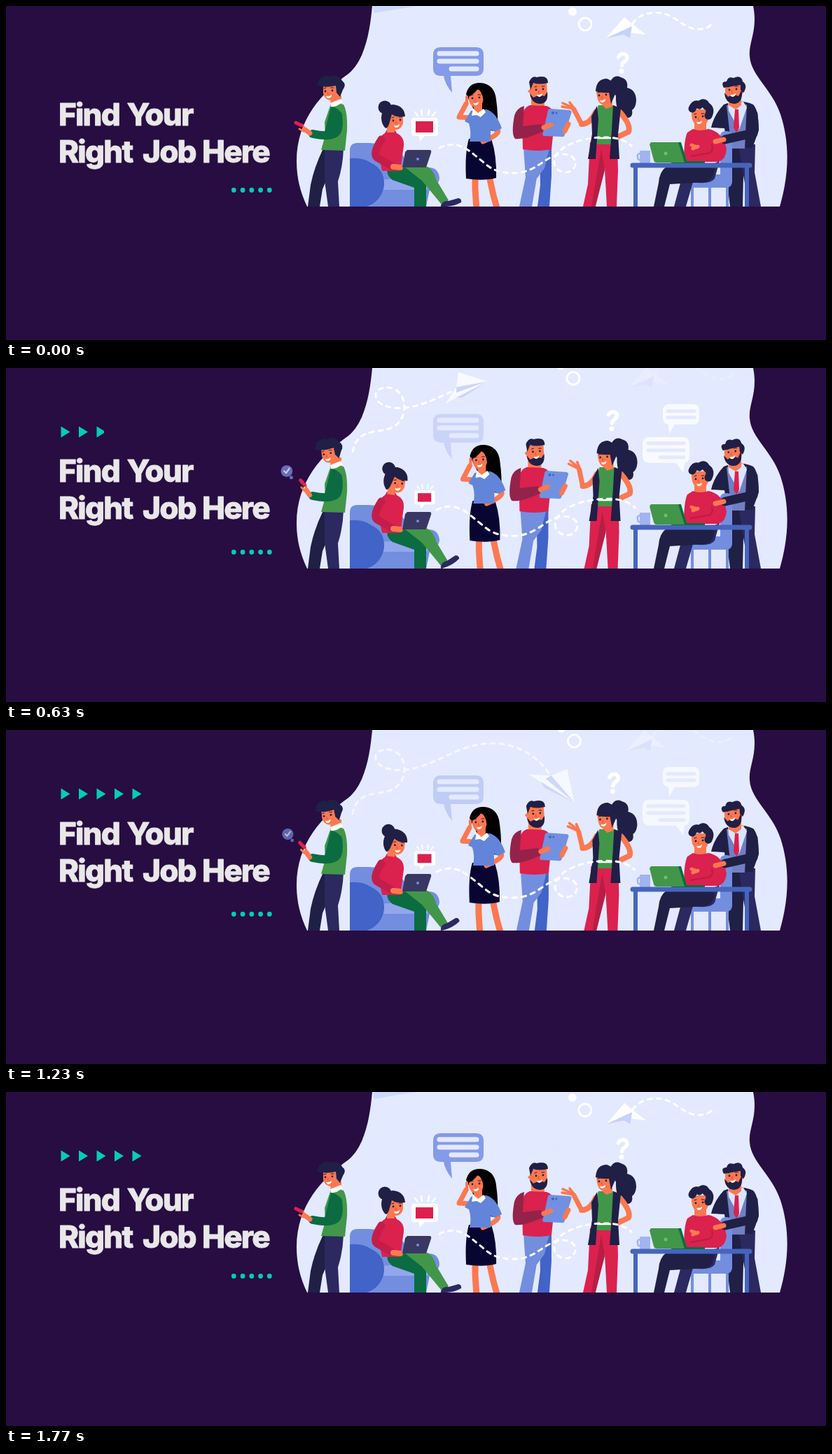
An HTML page that plays this animation: 1171 by 478 pixels, repeating every 1.8 s.

```html
<!DOCTYPE html>
<html lang="en">
<head>
<meta charset="utf-8">
<title>Find Your Right Job Here</title>
<style>
html, body { margin: 0; width: 100%; height: 100%; overflow: hidden; background: #270d42; }
svg { display: block; width: 1171px; height: 478px; }
text { font: 800 44px Inter, sans-serif; letter-spacing: -1.8px; fill: #e9e7e8; stroke: #e9e7e8; stroke-width: .8; stroke-linejoin: round; }
.line { fill: none; stroke-linecap: round; stroke-linejoin: round; }
.trail { stroke: #fff; stroke-width: 3; stroke-dasharray: 6 7; }
.skin { fill: #fb7850; } .skinLine { stroke: #fb7850; }
.navy { fill: #201f46; } .navyLine { stroke: #201f46; }
.ink { fill: #2b2960; }
.red { fill: #db214e; } .redLine { stroke: #db214e; }
.wine { fill: #93234a; }
.green { fill: #429649; }
.forest { fill: #0a6c40; } .forestLine { stroke: #0a6c40; }
.sky { fill: #738edf; } .skyLine { stroke: #738edf; }
.blue { fill: #4263c7; }
.white { fill: #fff; } .whiteLine { stroke: #fff; }
.fold { fill: #c5d2fa; }
.pale { fill: #e3e9ff; } .paleLine { stroke: #e3e9ff; }
</style>
</head>
<body>
<svg viewBox="0 0 1171 478">
<defs>
  <g id="face">
    <circle cx="-5" cy="-1" r="1.400" class="navy"/><circle cx="5" cy="-2" r="1.400" class="navy"/>
    <path class="line navyLine" d="M-7-5l3-1M3-6l4 0"/>
    <path class="line" stroke="#d95438" d="M-1 0l-1 3 2 0"/>
    <path class="white" d="M-4 6Q1 7 4 4Q4 8 0 9Q-3 9-4 6Z"/>
  </g>
  <clipPath id="stage"><path d="M0 0H1171V287H0Z"/></clipPath>
  <clipPath id="wipe"><rect id="wipeRect" x="78" y="80" height="24"/></clipPath>
  <mask id="reveal" maskUnits="userSpaceOnUse" x="480" y="0" width="350" height="140">
    <path id="revealPath" class="line whiteLine" stroke-width="9"/>
  </mask>
</defs>

<g clip-path="url(#stage)">
  <path class="pale" d="M523 0C520 32 514 76 489 97C452 123 415 162 415 222C415 250 422 270 430 287H1105C1119 238 1119 195 1106 155C1094 119 1064 100 1062 72C1060 52 1074 35 1067 0Z"/>
  <path id="sliver" fill="#cbd8ff" d="M523-6H610L586 0L526 10Z"/>

  <g id="rings">
    <circle cx="809" cy="8" r="6" class="white"/>
    <circle cx="827" cy="26" r="9" class="line whiteLine" stroke-width="3"/>
  </g>
  <g id="rightPlane">
    <path class="line trail" d="M895 25C903 12 920 8 935 10C956 13 965 30 985 33C998 34 1005 30 1008 25"/>
    <path class="white" d="M857 46L883 16L896 27L914 41L890 38Z"/>
    <path class="fold" d="M857 46L894 29L891 46L882 41Z"/>
  </g>
  <g id="question">
    <path class="line whiteLine" stroke-width="5.500" d="M874.500 73C877 67 887 67 887 74C887 80 880 79 879.500 85"/>
    <circle cx="879" cy="93" r="3.500" class="white"/>
  </g>

  <g id="blueBubble">
    <path fill="#849be9" d="M621 59H671Q682 59 682 70V89Q682 100 671 100H635L637 124Q627 112 625 100H621Q610 100 610 89V70Q610 59 621 59Z"/>
    <path class="line paleLine" stroke-width="7" d="M619 68H672M619 79H672M636 90H672"/>
  </g>
  <g id="whiteBubbles">
    <path class="white" d="M947 59H981Q990 59 990 68V79Q990 88 981 88H955L947 102L946 88Q938 87 938 79V68Q938 59 947 59Z"/>
    <path class="line paleLine" stroke-width="5" d="M945 69H983M945 78H983"/>
    <path class="white" d="M919 106H966Q976 106 976 116V133Q976 142 969 143L967 157L957 143H919Q909 143 909 133V116Q909 106 919 106Z"/>
    <path class="line paleLine" stroke-width="5" d="M917 115H968M917 125H968M934 135H968"/>
  </g>

  <g id="flight">
    <path id="flightTrail" class="line trail" mask="url(#reveal)"/>
    <g id="flyer">
      <path class="white" d="M0 0L-74 22L-51-1L-43-24Z"/>
      <path class="fold" d="M0 0L-51-1L-53 8Z"/><path class="fold" d="M0 0L-44 18L-55 16Z"/>
    </g>
  </g>

  <!-- reader with phone -->
  <path class="navy" d="M453 204H476L461 241L452 262L448 287H431L435 256Q440 231 453 204Z"/>
  <path class="ink" d="M455 204H482Q481 230 474 251L476 287H460L455 250Z"/>
  <path class="skin" d="M464 128H479V143H463Z"/>
  <path class="green" d="M464 140Q475 138 482 141Q488 152 487 178L484 207L450 206L456 185L455 166Z"/>
  <path class="white" d="M463 139L478 133L481 138L472 143L464 145Z"/>
  <path class="line forestLine" stroke-width="12" d="M474 156Q477 178 470 182Q460 188 438 183"/>
  <path class="forest" d="M464 144Q474 145 479 154L466 180L455 180Z"/>
  <g id="phone">
    <path class="line skinLine" stroke-width="7" d="M434 182L427 177"/>
    <path class="line skinLine" stroke-width="3" d="M427 176L423 170M425 179L419 176"/>
    <path class="line redLine" stroke-width="5" d="M414 167L422 171"/>
  </g>
  <g id="readerHead">
    <path class="skin" d="M453 113Q465 105 477 113L476 128Q472 135 463 135Q455 134 453 125Z"/>
    <path class="navy" d="M443 113Q447 109 447 105Q456 97 463 101Q475 96 480 107Q487 112 481 120L477 130L472 124L471 114Q455 118 443 113Z"/>
    <use href="#face" x="461" y="123"/>
  </g>
  <g id="check">
    <circle r="9" fill="#7888d9"/><circle cx="7" cy="10" r="2.700" fill="#7888d9"/>
    <path class="line whiteLine" stroke-width="2.400" d="M-4 0L-1 3L4-4"/>
  </g>

  <!-- sofa -->
  <path class="sky" d="M491 287V207Q491 196 502 196H518Q570 198 574 232H598Q617 228 619 246Q619 256 606 258L600 287Z"/>
  <path fill="#92a6ed" d="M525 250Q550 245 600 253Q615 260 617 245L612 257L600 263H540Z"/>
  <path class="blue" d="M491 287V218Q510 216 522 225Q541 234 540 257Q536 280 515 287Z"/>
  <path class="forest" d="M546 230L589 232Q601 238 600 254V287H583V260L552 249Q541 241 546 230Z"/>
  <path class="green" d="M570 231L602 230Q611 235 614 248L632 278L622 284L594 250Z"/>
  <path id="shoe" class="ink" d="M621 285Q624 278 632 279L646 275Q651 276 650 281Q638 288 621 287Z"/>
  <path class="red" d="M541 182L544 177H555L558 182Q569 187 568 200L563 236H537L532 210Q530 188 541 182Z"/>
  <path class="line" stroke="#c41d4a" stroke-width="11" d="M536 191Q523 211 530 217L551 229"/>
  <path class="line skinLine" stroke-width="8" d="M553 230L563 231"/>
  <g id="sitterHead">
    <circle cx="541" cy="145" r="9.500" class="navy"/>
    <path class="skin" d="M543 154H567L567 168Q564 178 555 177V181H544V170Z"/>
    <path class="navy" d="M536 160Q537 142 553 141Q569 143 570 158Q558 160 551 155L547 169Q544 177 541 174Q536 168 536 160Z"/>
    <use href="#face" x="558" y="165"/>
  </g>
  <path fill="#383863" d="M573 206H605Q608 206 607 210L600 231H566L570 209Z"/><circle cx="588" cy="219" r="2" class="sky"/>
  <g id="alert">
    <path class="white" d="M-16-13H15Q19-13 19-9V9Q19 13 15 13H0L-7 21L-9 13H-16Q-19 13-19 9V-9Q-19-13-16-13Z"/>
    <path class="red" d="M-13-8H12V8H-13Z"/>
    <path class="line whiteLine" stroke-width="2.500" d="M-10-16L-14-21M-4-17L-5-24M5-17L6-24M11-16L15-21"/>
  </g>

  <!-- caller -->
  <g id="caller">
    <path d="M657 126Q661 109 678 110Q698 112 700 134Q703 155 702 179Q688 181 676 164Z"/>
    <path class="line skinLine" stroke-width="9" d="M670 247V262L672 292M691 247Q695 270 702 292"/>
    <path fill="#090532" d="M661 190H693Q701 214 700 246Q682 251 657 247Q655 210 661 190Z"/>
    <path class="line skinLine" stroke-width="7" d="M663 160L647 159L657 140M702 177Q707 183 681 194"/>
    <path fill="#6385d9" d="M664 150L686 148Q700 152 708 175L698 180L692 177L692 194H662Q665 180 661 168L655 165Z"/>
    <path class="skin" d="M668 137H680V150L674 155L668 150Z"/>
    <path class="white" d="M667 147L674 153L682 147L685 152L678 159L672 156L665 157Z"/>
    <path class="skin" d="M661 122Q670 115 682 124V134Q679 146 670 146Q663 143 661 135Z"/>
    <path d="M659 131Q660 112 677 112Q687 115 688 138L681 143Q684 128 674 118Q669 126 659 131Z"/>
    <use href="#face" x="671" y="133"/>
    <path class="line skinLine" stroke-width="4" d="M658 140L658 130"/>
  </g>

  <!-- tablet holder -->
  <g id="tabletMan">
    <path class="sky" d="M739 202H769L758 246L751 287H733L742 245Z"/>
    <path class="blue" d="M762 203H779V243L776 287H759L763 256Z"/><path class="sky" d="M742 200H777L769 232L758 247Z"/>
    <path class="skin" d="M750 132H769V145L761 149L750 144Z"/>
    <path class="red" d="M748 142L772 143Q782 146 784 158L779 205Q760 209 738 205L737 157Q739 145 748 142Z"/>
    <path class="wine" d="M740 143L738 172L764 169L770 178Q741 192 727 190Q721 184 726 157Q729 146 740 143Z"/>
    <path class="skin" d="M749 109H772L773 126Q771 139 761 139Q750 136 749 126L745 122L749 118Z"/>
    <path class="navy" d="M748 125L753 131Q761 126 769 129L773 123Q775 140 762 140Q750 139 748 125Z"/>
    <path class="navy" d="M749 120L747 109Q751 99 758 102Q774 98 774 110Q762 113 753 110Z"/>
    <use href="#face" x="762" y="121"/>
    <path fill="#7290e1" d="M776 147L805 149Q809 150 807 154L798 184Q797 188 793 187L768 186Q765 184 767 181L774 149Z"/>
    <circle cx="781" cy="153" r="2" class="blue"/><circle cx="786" cy="153" r="1.500" class="blue"/>
    <path class="line skinLine" stroke-width="7" d="M768 174L778 170M798 179L803 169"/>
  </g>

  <!-- asking woman -->
  <g id="asker">
    <path class="navy" d="M862 110Q868 97 878 102Q889 105 887 117Q900 120 900 136Q899 146 894 149Q896 161 885 160Q870 153 871 129Z"/>
    <path class="red" d="M834 195H873L874 235L872 287H858L855 232L842 287H824L831 255Z"/>
    <path fill="#b71d45" d="M850 205L855 235L847 266L841 287H836Z"/>
    <path class="line skinLine" stroke-width="8" d="M842 152Q834 169 822 169M877 152Q893 171 889 180L872 188"/>
    <g id="askerArm">
      <path class="line skinLine" stroke-width="7" d="M822 169L811 148"/>
      <path class="line skinLine" stroke-width="3.500" d="M811 147L794 144M809 145L795 139M812 147L805 138"/>
    </g>
    <path class="green" d="M846 142H868L871 198H839L842 154Z"/>
    <path class="navy" d="M844 143L846 162L842 219H831L837 183L836 158ZM867 142L878 146L874 184L876 219H862L865 178Z"/>
    <path class="line whiteLine" stroke-width="2.500" d="M845 189H863"/>
    <path class="skin" d="M843 117Q857 109 866 118V144L857 147L851 141Q843 138 843 117Z"/>
    <path class="navy" d="M842 122Q843 104 858 104Q873 109 870 126L864 140L861 124Q851 125 842 122Z"/>
    <use href="#face" x="852" y="129"/>
  </g>

  <!-- mentor -->
  <path class="navy" d="M1035 200H1054L1052 287H1034L1027 230Z"/>
  <path class="ink" d="M1046 198H1070L1069 238L1078 287H1061L1052 237Z"/>
  <path class="navy" d="M1025 141Q1048 132 1067 141Q1075 149 1075 178L1066 203H1030L1026 175L1007 174Q1011 156 1025 141Z"/>
  <path fill="#7180c5" d="M1029 142L1058 141L1055 204H1036Z"/>
  <path fill="#dce5ff" d="M1031 138L1053 137L1058 145L1047 177L1032 150Z"/>
  <path class="red" d="M1041 148H1046L1047 174L1043 181L1039 174Z"/>
  <path class="skin" d="M1032 129H1050V142L1042 148L1032 142Z"/>
  <g id="mentorHead">
    <path class="skin" d="M1027 111Q1040 103 1051 112L1055 122L1050 127Q1049 138 1039 138Q1028 135 1027 123Z"/>
    <path class="navy" d="M1026 124L1031 130Q1039 125 1046 129L1051 119Q1053 139 1040 140Q1027 139 1026 124ZM1025 117Q1020 108 1029 108Q1031 100 1039 103Q1050 98 1052 108Q1060 114 1053 124L1049 120V113Q1036 115 1025 117Z"/>
    <use href="#face" x="1038" y="121"/>
  </g>

  <!-- chair and desk worker -->
  <path class="line skyLine" stroke-width="4" d="M980 258V290M1005 258V290M1030 258V290"/>
  <path class="sky" d="M1020 186Q1020 179 1029 179Q1037 179 1037 187V252Q1036 260 1028 260H980Q973 252 982 241H1020Z"/>
  <path class="ink" d="M1019 222L1012 247Q1005 256 981 252L971 287H954L965 246Q970 234 989 234Z"/>
  <path class="navy" d="M1002 231L943 230Q933 237 932 253L925 287H940L948 255L999 252Q1010 249 1012 233Z"/>
  <path class="skin" d="M983 164H1000V181H983Z"/>
  <path class="red" d="M981 176Q991 180 1003 176Q1024 180 1029 205Q1028 219 1018 223H968Q968 191 973 181Z"/>
  <path class="line" stroke="#b71d45" stroke-width="2" d="M1008 199Q1011 210 1001 211L978 215"/>
  <path class="line skinLine" stroke-width="5" d="M979 199L987 202M981 204L988 201"/>
  <path class="skin" d="M979 148H1003V162Q1000 173 990 173Q980 169 979 157Z"/>
  <path class="line navyLine" stroke-width="11" d="M980 147Q984 138 990 142Q997 135 1000 143Q1008 147 1003 157"/>
  <use href="#face" x="990" y="160"/>
  <path class="line navyLine" stroke-width="13" d="M1067 155L1067 182L1027 191"/>
  <path class="line skinLine" stroke-width="7" d="M1025 191L1013 194"/>
  <path fill="#a2b4ef" d="M905 207H920V225H905Z"/><path class="line" stroke="#a2b4ef" stroke-width="2.500" d="M906 211Q901 211 902 216Q902 221 906 220"/>
  <path class="line" stroke="#4665bb" stroke-width="7" d="M895 228H1062"/><path class="line" stroke="#4665bb" stroke-width="6" d="M899 230V292M1058 230V292"/>
  <path class="forest" d="M958 195H964L972 222H998V225H950Z"/>
  <path class="green" d="M921 195H960L969 224H929Q926 224 925 221L919 198Z"/><circle cx="942" cy="211" r="2.500" fill="#77bd68"/>

  <path id="loop" class="line trail" d="M619 203C646 190 661 207 680 222C695 236 706 239 727 239C756 238 766 219 787 213C808 208 818 222 811 232C803 243 786 238 783 226C780 205 814 189 850 188C874 187 885 193 893 200"/>
</g>

<g id="heading">
  <text y="170.500"><tspan x="75">Find</tspan> <tspan x="172.500">Your</tspan></text>
  <text y="223.500"><tspan x="75">Right</tspan> <tspan x="195">Job</tspan> <tspan x="280">Here</tspan></text>
</g>
<path clip-path="url(#wipe)" fill="#06cdb4" d="M78.500 83.500l13 8-13 8zm25.500 0l13 8-13 8zm25.500 0l13 8-13 8zm25.500 0l13 8-13 8zm25.500 0l13 8-13 8z"/>
<path class="line" stroke="#06cdb4" stroke-width="6.800" stroke-dasharray="0 12.750" d="M325.300 263.500H377"/>
</svg>

<script>
const LOOP = 1800, STEP = 30;
const FLIGHT = "M495 120C500 90 525 92 543 88C562 84 569 68 569 57C569 40 560 29 545 28C530 28 524 36 530 46C536 55 555 59 571 57C620 50 645 18 700 19C740 22 765 45 778 66L812 104";
const PLANE_LEAD = 58, HEADING_LAG = 30;
const $ = id => document.getElementById(id);
const clamp = x => Math.max(0, Math.min(1, x));
const move = (id, x, y) => $(id).setAttribute("transform", `translate(${x} ${y})`);
const turn = (id, angle, x, y) => $(id).setAttribute("transform", `rotate(${angle} ${x} ${y})`);
const fade = (id, opacity) => $(id).setAttribute("opacity", opacity);

const flightPath = $("flightTrail"), revealPath = $("revealPath");
flightPath.setAttribute("d", FLIGHT);
revealPath.setAttribute("d", FLIGHT);
const trailLength = flightPath.getTotalLength() - PLANE_LEAD;

function drawFlight(t, swing) {
  const done = trailLength * clamp((t - 120) / 790);
  const nose = flightPath.getPointAtLength(done + PLANE_LEAD);
  const tail = flightPath.getPointAtLength(done + PLANE_LEAD - HEADING_LAG);
  const angle = Math.atan2(nose.y - tail.y, nose.x - tail.x) * 180 / Math.PI;
  const scale = t < 900 ? .4 + .6 * swing : 1;
  revealPath.setAttribute("stroke-dasharray", `${done} 2000`);
  $("flyer").setAttribute("transform", `translate(${nose.x} ${nose.y}) rotate(${angle}) scale(${scale})`);
  fade("flyer", swing);
  fade("flightTrail", t < 900 ? Math.min(1, 2 * swing) : swing);
}

function draw(now) {
  const t = Math.floor(now % LOOP / STEP) * STEP;
  const swing = (1 - Math.cos(2 * Math.PI * t / LOOP)) / 2;
  const drift = swing ** .8;

  move("heading", 0, -9 * drift);
  move("sliver", 0, -15 * drift);
  move("rings", -20.5 * drift, -13.5 * drift);
  move("rightPlane", 38 * drift, -21 * drift);
  fade("rightPlane", 1 - swing);
  move("question", -18 * swing, -7.5 * swing);
  move("blueBubble", 0, 8.5 * swing);
  fade("blueBubble", 1 - swing ** 1.3);
  move("whiteBubbles", 0, -9 * swing);
  fade("whiteBubbles", swing);

  turn("readerHead", -8 * swing, 470, 142);
  turn("phone", 27 * swing, 434, 181);
  $("check").setAttribute("transform", `translate(${414 - 16.5 * swing} ${161 - 17 * swing}) scale(${.65 + .35 * swing})`);
  fade("check", swing);
  turn("sitterHead", 11 * swing, 549, 182);
  turn("shoe", -22 * swing, 622, 286);
  $("alert").setAttribute("transform", `translate(598 ${173 + 15.5 * swing}) scale(${1 - .29 * swing})`);
  move("caller", 6.5 * drift, 0);
  move("tabletMan", -5.5 * drift, 0);
  move("asker", 2 * swing, 0);
  turn("askerArm", 20 * swing, 822, 169);
  turn("mentorHead", -4 * swing, 1042, 142);
  $("loop").setAttribute("transform", `translate(742 205) scale(${1 + .045 * swing}) translate(-742 -205)`);

  drawFlight(t, swing);
  $("wipeRect").setAttribute("width", 118 * clamp((t - 220) / 780));
  requestAnimationFrame(draw);
}
draw(0);
</script>
</body>
</html>
```
